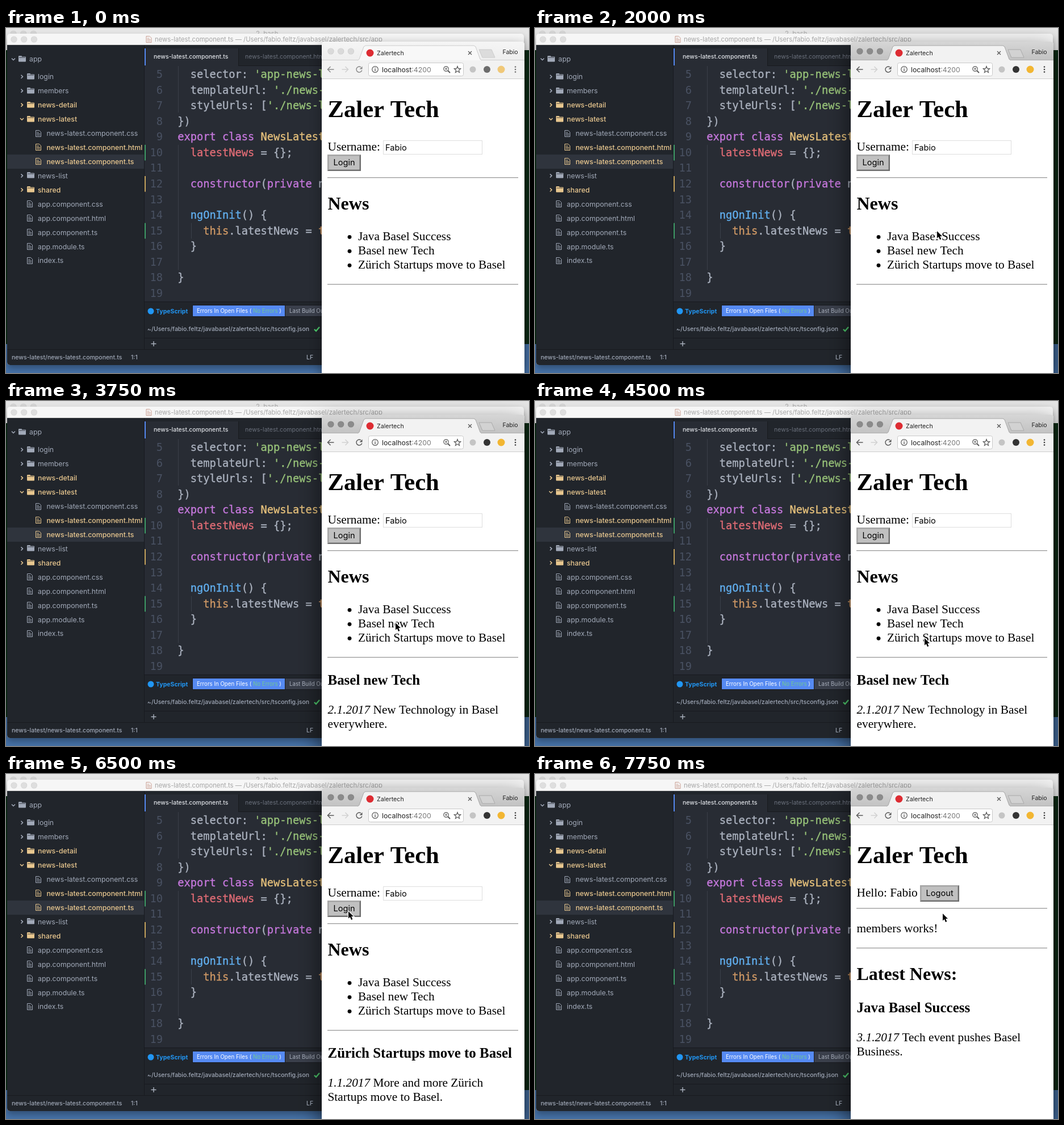
Animation of 921 by 608 pixels, one loop 8000 ms. Source, as an HTML page with a canvas:

```html
<!DOCTYPE html>
<html lang="en">
<head>
<meta charset="utf-8">
<title>News demo</title>
<style>
  html, body { margin: 0; width: 100%; height: 100%; overflow: hidden; }
  canvas { display: block; width: 921px; height: 608px; }
</style>
</head>
<body>
<canvas id="stage"></canvas>
<script>
const W = 921, H = 608, LOOP = 8000, TICK = 250;
const canvas = document.getElementById('stage');
const ctx = canvas.getContext('2d');
const dpr = window.devicePixelRatio || 1;
canvas.width = W * dpr;
canvas.height = H * dpr;
ctx.scale(dpr, dpr);

const SANS = 'Inter, "Open Sans", sans-serif';
const SERIF = '"Liberation Serif", serif';
const MONO = '"DejaVu Sans Mono", monospace';
const USER = 'Fabio', SITE = 'Zaler Tech', SLUG = 'zalertech';
const HOME = '/Users/fabio.feltz/javabasel/' + SLUG + '/src/';
const FILE = 'news-latest.component';

const C = {
  bg: '#282c34', panel: '#21252b', line: '#181a1f', text: '#abb2bf', ui: '#a1a9b8',
  dim: '#495162', purple: '#c678dd', green: '#98c379', red: '#e06c75', yellow: '#e5c07b',
  blue: '#61afef', orange: '#d19a66', mod: '#e8c78f', accent: '#568af2'
};

// Mouse positions: [time, x, y]
const MOUSE = [
  [750, 730, 278], [1000, 698, 363], [1250, 698, 366], [1500, 728, 337], [1750, 727, 332],
  [2000, 707, 357], [2250, 689, 369], [3000, 690, 371], [3250, 684, 387], [3500, 685, 390],
  [4000, 684, 407], [4250, 686, 416], [4500, 685, 417], [5250, 686, 418], [5500, 727, 296],
  [6250, 652, 255], [6500, 602, 241], [7500, 594, 211], [7750, 717, 245]
];

const NEWS = [
  { title: 'Java Basel Success', date: '3.1.2017', body: ['Tech event pushes Basel', 'Business.'] },
  { title: 'Basel new Tech', date: '2.1.2017', body: ['New Technology in Basel', 'everywhere.'] },
  { title: 'Zürich Startups move to Basel', date: '1.1.2017', body: ['More and more Zürich', 'Startups move to Basel.'] }
];

function rect(x, y, w, h, color) {
  ctx.fillStyle = color;
  ctx.fillRect(x, y, w, h);
}

function disc(x, y, r, color) {
  ctx.fillStyle = color;
  ctx.beginPath();
  ctx.arc(x, y, r, 0, 7);
  ctx.fill();
}

function trace(points, close) {
  ctx.beginPath();
  points.forEach(([x, y], i) => i ? ctx.lineTo(x, y) : ctx.moveTo(x, y));
  if (close) ctx.closePath();
}

function stroke(points, color, width = 1, close = false) {
  trace(points, close);
  ctx.strokeStyle = color;
  ctx.lineWidth = width;
  ctx.stroke();
}

function rounded(x, y, w, h, r) {
  ctx.beginPath();
  ctx.roundRect(x, y, w, h, r);
}

// Draws text and returns the x where it ends
function label(s, x, y, size, color, family = SANS, style = '') {
  ctx.font = `${style} ${size}px ${family}`;
  ctx.fillStyle = color;
  ctx.fillText(s, x, y);
  return x + ctx.measureText(s).width;
}

// Code text, slightly thickened
function mono(s, x, y, size, color) {
  const end = label(s, x, y, size, color, MONO);
  ctx.strokeStyle = color;
  ctx.lineWidth = .35;
  ctx.strokeText(s, x, y);
  return end;
}

function lights(x, y, step, color, edge) {
  for (let i = 0; i < 3; i++) {
    disc(x + i * step, y, 5.6, edge);
    disc(x + i * step, y, 5, color);
  }
}

function drawDesktop() {
  rect(0, 0, W, H, '#4672a8');
  rect(0, 0, W, 557, '#0b2b14');
  rect(0, 0, W, 39, '#e6e6e6');
  lights(13, 10, 17.7, '#d6d6d6', '#cccccc');
  label('2. bash', 440, 14, 11.3, '#a8a8a8');
}

function docIcon(x, y, color) {
  ctx.strokeStyle = color;
  ctx.lineWidth = 1;
  trace([[x + .5, y - 5.5], [x + 6.5, y - 5.5], [x + 9.5, y - 2.5], [x + 9.5, y + 5.5], [x + .5, y + 5.5]], true);
  ctx.stroke();
  for (const d of [-2, 0.5, 3]) rect(x + 2, y + d - .5, d < 0 ? 4 : 6, 1, color);
}

function folderIcon(x, y, color) {
  ctx.fillStyle = color;
  rounded(x, y - 5, 6, 4, 1);
  ctx.fill();
  rounded(x, y - 3.5, 13, 9, 1);
  ctx.fill();
  rect(x + 1, y - 2.4, 11, .8, C.panel);
}

function chevron(x, y, open, color) {
  const p = open ? [[x - 3, y - 1.5], [x, y + 1.5], [x + 3, y - 1.5]]
                 : [[x - 1.5, y - 3], [x + 1.5, y], [x - 1.5, y + 3]];
  stroke(p, color, 1.5);
}

function drawTree() {
  rect(2, 30, 241, 536, C.panel);
  rect(2, 223, 241, 25, '#2f343d');
  rect(243, 30, 1, 536, C.line);
  chevron(13, 55, true, C.ui);
  folderIcon(22, 54, C.ui);
  label('app', 41, 59, 12.3, C.ui);
  // Each entry: kind (> closed, v open, - file, = nested file), * when modified
  const rows = ['> login', '> members', '>*news-detail', 'v*news-latest',
    '= ' + FILE + '.css', '=*' + FILE + '.html', '=*' + FILE + '.ts', '> news-list', '>*shared',
    '- app.component.css', '- app.component.html', '- app.component.ts', '- app.module.ts', '- index.ts'];
  rows.forEach((row, i) => {
    const y = 85.7 + i * 24.95, kind = row[0], modified = row[1] === '*';
    const color = modified ? C.mod : C.ui, x = kind === '=' ? 71.4 : 56;
    if (kind === '>' || kind === 'v') {
      chevron(28, y, kind === 'v', color);
      folderIcon(37, Math.round(y) - 1, color);
    } else {
      docIcon(Math.floor(x) - 19, Math.round(y), color);
    }
    label(row.slice(2), x, y + 4.4, 12.3, color, SANS, modified ? '500' : '');
  });
}

function drawCode() {
  rect(244, 67, 668, 416, C.bg);
  const size = 18.72, left = 302.2, col = size * .602, lh = 27.57;
  const top = n => 88 + (n - 5) * lh;
  const code = {
    5: [['  selector: ', C.text], ["'app-news-latest'", C.green]],
    6: [['  templateUrl: ', C.text], ["'./news-latest'", C.green]],
    7: [['  styleUrls: [', C.text], ["'./news-latest'", C.green]],
    8: [['})', C.text]],
    9: [['export class ', C.purple], ['NewsLatestComponent', C.yellow]],
    10: [['  latestNews', C.red], [' = {};', C.text]],
    12: [['  constructor', C.purple], ['(', C.text], ['private ', C.purple], ['news', C.text]],
    14: [['  ngOnInit', C.blue], ['() {', C.text]],
    15: [['    this', C.orange], ['.latestNews = ', C.text], ['this', C.orange]],
    16: [['  }', C.text]],
    18: [['}', C.text]]
  };
  const guide = '#3a3f49';
  rect(303, 67, 1, 82, guide);
  rect(303, top(10) - 20, 1, lh * 8, guide);
  rect(326, top(15) - 20, 1, lh, guide);
  for (let n = 5; n < 20; n++) {
    label(n, 276 - String(n).length * col, top(n), size, C.dim, MONO);
    let x = left;
    for (const [s, color] of code[n] || []) x = mono(s, x, top(n), size, color);
  }
  for (const [n, color] of [[10, '#3f9d68'], [12, '#c6a45e'], [15, '#3f9d68']])
    rect(244, top(n) - 20, 2, lh, color);
}

function panelButton(x, w, color) {
  rect(x, 489, w, 19, color);
  ctx.strokeStyle = C.line;
  ctx.lineWidth = 1;
  ctx.strokeRect(x - .5, 488.5, w + 1, 20);
}

function drawPanel() {
  rect(244, 482, 668, 84, C.panel);
  rect(244, 482, 668, 1, C.line);
  rect(244, 546, 668, 1, C.line);
  disc(255, 499, 5.5, '#2196f3');
  label('TypeScript', 264, 503, 10.5, '#2196f3', SANS, 'bold');
  panelButton(329, 162, C.accent);
  let x = label('Errors In Open Files ( ', 336, 502, 9.7, '#ffffff');
  x = label('No Errors', x, 502, 9.7, '#73c990');
  label(' )', x, 502, 9.7, '#ffffff');
  panelButton(492, 100, '#3a3f4b');
  label('Last Build Output', 499, 502, 9.7, C.text);
  label('~' + HOME + 'tsconfig.json', 249, 534, 10.5, C.ui, SANS, '500');
  stroke([[543, 531], [546, 534], [552, 527]], '#4cc76a', 2.4);
  stroke([[255.5, 556.5], [264.5, 556.5]], C.text, 1.4);
  stroke([[260, 552], [260, 561]], C.text, 1.4);

  rect(2, 566, 910, 28, C.panel);
  rect(2, 566, 910, 1, C.line);
  label('news-latest/' + FILE + '.ts', 10, 584, 10.5, C.ui, SANS, '500');
  label('1:1', 220, 584, 10.5, C.ui, SANS, '500');
  label('LF', 529, 584, 10.5, C.ui, SANS, '500');
}

function drawEditor() {
  ctx.save();
  ctx.shadowColor = 'rgba(0,0,0,.3)';
  ctx.shadowBlur = 12 * dpr;
  ctx.shadowOffsetY = 6 * dpr;
  ctx.fillStyle = '#f6f6f6';
  rounded(2, 10, 910, 584, 5);
  ctx.fill();
  ctx.restore();
  ctx.save();
  rounded(2, 10, 910, 584, 5);
  ctx.clip();

  lights(14, 20, 17.7, '#dedede', '#d0d0d0');
  docIcon(246.5, 20, '#c99d90');
  label(FILE + '.ts — ' + HOME + 'app', 262, 24, 11.27, '#a6a6a6');
  rect(2, 29, 910, 1, '#d5d5d5');

  rect(244, 30, 668, 37, C.panel);
  rect(244, 66, 668, 1, C.line);
  drawCode();
  rect(244, 36, 165, 31, C.bg);
  rect(244, 36, 2, 30, C.accent);
  rect(409, 36, 1, 31, C.line);
  label(FILE + '.ts', 260, 54, 10.5, '#e0e3e8', SANS, '500');
  label(FILE + '.html', 421, 54, 10.5, '#6b717d');
  drawTree();
  drawPanel();
  ctx.restore();
}

function drawToolbar(active) {
  const ink = active ? '#5a5a5a' : '#8a8a8a', dark = active ? '#3c3c3c' : '#707070';
  const arrow = (x, dir, color) => {
    stroke([[x - 5.5, 73], [x + 5.5, 73]], color, 1.5);
    stroke([[x - dir * .5, 68], [x - dir * 5.5, 73], [x - dir * .5, 78]], color, 1.5);
  };
  arrow(572, 1, ink);
  arrow(597, -1, '#d0d0d0');
  ctx.strokeStyle = ink;
  ctx.lineWidth = 1.5;
  ctx.beginPath();
  ctx.arc(622, 73, 5, .3, 5.3);
  ctx.stroke();
  trace([[627.5, 67.5], [627.5, 72.5], [622.5, 72.5]], true);
  ctx.fillStyle = ink;
  ctx.fill();

  ctx.fillStyle = '#ffffff';
  rounded(638.5, 61.5, 167, 23, 3);
  ctx.fill();
  ctx.strokeStyle = '#c9c9c9';
  ctx.lineWidth = 1;
  ctx.stroke();
  ctx.strokeStyle = '#5a5a5a';
  ctx.lineWidth = 1.2;
  ctx.beginPath();
  ctx.arc(650, 73, 5.3, 0, 7);
  ctx.stroke();
  rect(649.3, 72, 1.4, 4, '#5a5a5a');
  rect(649.3, 69.6, 1.4, 1.4, '#5a5a5a');
  label(':4200', label('localhost', 662, 77.5, 12.25, '#222222'), 77.5, 12.25, '#777777');

  ctx.strokeStyle = '#555555';
  ctx.beginPath();
  ctx.arc(775, 72, 4.2, 0, 7);
  ctx.stroke();
  stroke([[778, 75], [782, 79]], '#555555', 1.8);
  stroke([[773, 72], [777, 72]], '#555555');
  stroke([[775, 70], [775, 74]], '#555555');
  const star = [];
  for (let i = 0; i < 10; i++) {
    const r = i % 2 ? 2.6 : 6, a = i * Math.PI / 5 - Math.PI / 2;
    star.push([795 + r * Math.cos(a), 73.5 + r * Math.sin(a)]);
  }
  stroke(star, '#555555', 1.2, true);

  disc(822, 73, 5.5, '#c4c4c4');
  disc(847, 73, 6, active ? '#333333' : '#6c6c6c');
  disc(872, 73, 6.5, active ? '#f2b632' : '#f0c878');
  for (const y of [68.5, 73, 77.5]) disc(897, y, 1.3, dark);
}

function drawBrowser(active) {
  ctx.save();
  ctx.shadowColor = active ? 'rgba(0,0,0,.6)' : 'rgba(0,0,0,.4)';
  ctx.shadowBlur = (active ? 42 : 20) * dpr;
  ctx.shadowOffsetY = (active ? 14 : 6) * dpr;
  ctx.fillStyle = '#ffffff';
  rounded(556, 24, 357, 620, 5);
  ctx.fill();
  ctx.restore();

  const strip = ctx.createLinearGradient(0, 24, 0, 57);
  strip.addColorStop(0, active ? '#d6d6d6' : '#f5f5f5');
  strip.addColorStop(1, active ? '#c2c2c2' : '#eeeeee');
  ctx.fillStyle = strip;
  rounded(556, 24, 357, 40, [5, 5, 0, 0]);
  ctx.fill();
  rect(556, 57, 357, 33, '#f2f2f2');
  rect(556, 56, 357, 1, active ? '#adadad' : '#cfcfcf');
  rect(556, 89, 357, 1, '#cccccc');
  if (active) lights(572, 41, 17.7, '#8b8b8b', '#7e7e7e');
  else lights(572, 41, 17.7, '#dadada', '#c9c9c9');

  const tab = [[619, 57], [622, 55], [630, 33], [633, 31], [824, 31], [827, 33], [835, 55], [838, 57]];
  trace(tab, true);
  ctx.fillStyle = active ? '#f2f2f2' : '#f8f8f8';
  ctx.fill();
  stroke(tab, active ? '#a8a8a8' : '#cccccc');
  trace([[833, 38], [855, 38], [861, 52], [839, 52]], true);
  ctx.fillStyle = active ? '#d2d2d2' : '#dcdcdc';
  ctx.fill();
  ctx.strokeStyle = active ? '#aaaaaa' : '#cccccc';
  ctx.stroke();
  disc(641, 44, 6.5, '#dd2c33');
  label('Zalertech', 653, 48, 10.7, '#222222');
  stroke([[814, 41], [820, 47]], '#555555', 1.3);
  stroke([[820, 41], [814, 47]], '#555555', 1.3);
  label(USER, 874.5, 45.5, 10.5, '#222222');
  drawToolbar(active);
}

const serif = (s, x, y, size = 21.33, style = '') => label(s, x, y, size, '#000000', SERIF, style);
const rule = y => { rect(566, y, 336, 1.3, '#999999'); rect(566, y + 1.3, 336, .7, '#e2e2e2'); };

function button(s, x, y, w) {
  rect(x, y, w, 29, '#a6a6a6');
  ctx.fillStyle = '#6e6e6e';
  trace([[x, y + 29], [x + 2.6, y + 26.4], [x + w - 2.6, y + 26.4], [x + w - 2.6, y + 2.6], [x + w, y], [x + w, y + 29]], true);
  ctx.fill();
  rect(x + 2.6, y + 2.6, w - 5.2, 23.8, '#c0c0c0');
  label(s, x + 10.6, y + 19, 14.6, '#000000');
}

function article(item, y) {
  serif(item.title, 566.5, y, 24.96, 'bold');
  const x = serif(item.date, 566.5, y + 51, 21.33, 'italic');
  serif(' ' + item.body[0], x, y + 51);
  serif(item.body[1], 566.5, y + 76);
}

function drawLogin(t) {
  serif('Username: ', 566.5, 216);
  rect(664, 198, 175, 25, '#dedede');
  rect(665, 199, 173, 23, '#ffffff');
  label(USER, 668, 216, 14.6, '#000000');
  button('Login', 566, 223, 59);
  rule(263);
  serif('News', 566.5, 320, 32, 'bold');
  if (t >= 5000 && t < 5750) {
    ctx.font = `21.33px ${SERIF}`;
    rect(620 + ctx.measureText('Zürich ').width, 405, ctx.measureText('Startups').width, 25, '#b3d7fe');
  }
  NEWS.forEach((item, i) => {
    disc(605, 368.3 + i * 25, 3.4, '#000000');
    serif(item.title, 620, 374 + i * 25);
  });
  rule(451);
  const open = t < 2750 ? -1 : t < 3750 ? 0 : t < 5000 ? 1 : 2;
  if (open >= 0) article(NEWS[open], 500);
}

function drawMembers() {
  serif('Hello: ' + USER, 566.5, 216);
  button('Logout', 678, 196, 69);
  rule(236);
  serif('members works!', 566.5, 279);
  rule(306);
  serif('Latest News:', 566.5, 363, 32, 'bold');
  article(NEWS[0], 420);
}

function drawPointer(t) {
  const at = MOUSE.filter(m => m[0] <= t).pop();
  if (!at) return;
  ctx.save();
  ctx.translate(at[1] + 1, at[2] + 1);
  trace([[0, 0], [0, 12.5], [2.9, 9.9], [5, 15], [7.3, 14], [5.2, 9.1], [9, 9.1]], true);
  ctx.strokeStyle = '#ffffff';
  ctx.lineWidth = 2;
  ctx.stroke();
  ctx.fillStyle = '#000000';
  ctx.fill();
  ctx.restore();
}

function draw(t) {
  ctx.clearRect(0, 0, W, H);
  drawDesktop();
  drawEditor();
  drawBrowser(t >= 2000);
  serif(SITE, 566.5, 157, 42.67, 'bold');
  if (t < 7000) drawLogin(t);
  else drawMembers();
  drawPointer(t);
}

let last = -1;
function frame() {
  const step = Math.floor(performance.now() % LOOP / TICK);
  if (step !== last) draw(step * TICK);
  last = step;
  requestAnimationFrame(frame);
}
frame();
</script>
</body>
</html>
```
